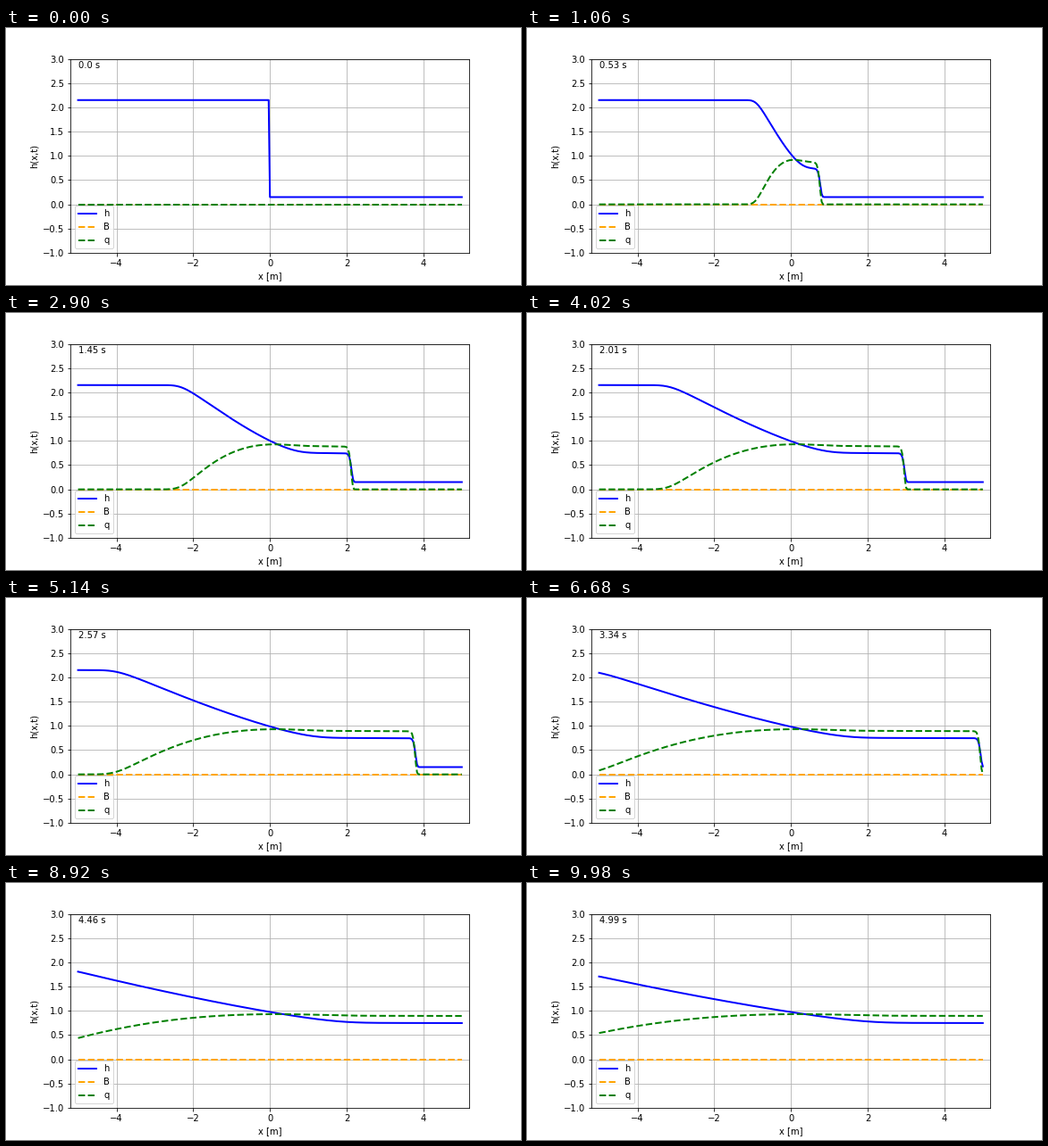
A matplotlib script that plays this animation: 576 px wide and 288 px high, repeating every 10 s.

```python
import matplotlib.pyplot as plt
import numpy as np
from matplotlib.animation import FuncAnimation

# Dam break: 1D shallow water equations, local Lax-Friedrichs scheme
G = 1.0
H_LEFT, H_RIGHT = 2.15, 0.15
CELLS = 301
FRAMES = 500
DT = 0.01

x = np.linspace(-5, 5, CELLS)
dx = x[1] - x[0]


def flux(state):
    h, q = state
    return np.array([q, q**2 / h + G * h**2 / 2])


def wave_speed(state):
    h, q = state
    return np.abs(q / h) + np.sqrt(G * h)


def advance(state):
    padded = np.pad(state, ((0, 0), (1, 1)), mode="edge")
    f, a = flux(padded), wave_speed(padded)
    a_face = np.maximum(a[:-1], a[1:])
    face = (f[:, :-1] + f[:, 1:] - a_face * np.diff(padded)) / 2
    return state - DT / dx * np.diff(face)


def solve():
    h = np.where(x < -dx / 2, H_LEFT, H_RIGHT)
    states = [np.array([h, np.zeros(CELLS)])]
    for _ in range(FRAMES - 1):
        states.append(advance(states[-1]))
    return states


states = solve()

plt.rcParams.update({"font.family": "DejaVu Sans", "font.size": 10})
fig, ax = plt.subplots(figsize=(8, 4), dpi=72)
fig.subplots_adjust(left=0.125, right=0.9, bottom=0.125, top=0.88)
ax.set(xlim=(-5.2, 5.2), ylim=(-1, 3), xlabel="x [m]", ylabel="h(x,t)")
ax.grid()

h_line, = ax.plot(x, states[0][0], color="blue", lw=2, label="h")
ax.plot(x, np.zeros(CELLS), "--", color="orange", lw=2, label="B")
q_line, = ax.plot(x, states[0][1], "--", color="green", lw=2, label="q")
clock = ax.text(-5, 2.8, "")
ax.legend(loc="lower left")


def draw(i):
    h, q = states[i]
    h_line.set_ydata(h)
    q_line.set_ydata(q)
    clock.set_text(f"{round(i * DT, 2)} s")
    return h_line, q_line, clock


anim = FuncAnimation(fig, draw, frames=FRAMES, interval=20, repeat=True)
plt.show()
```
